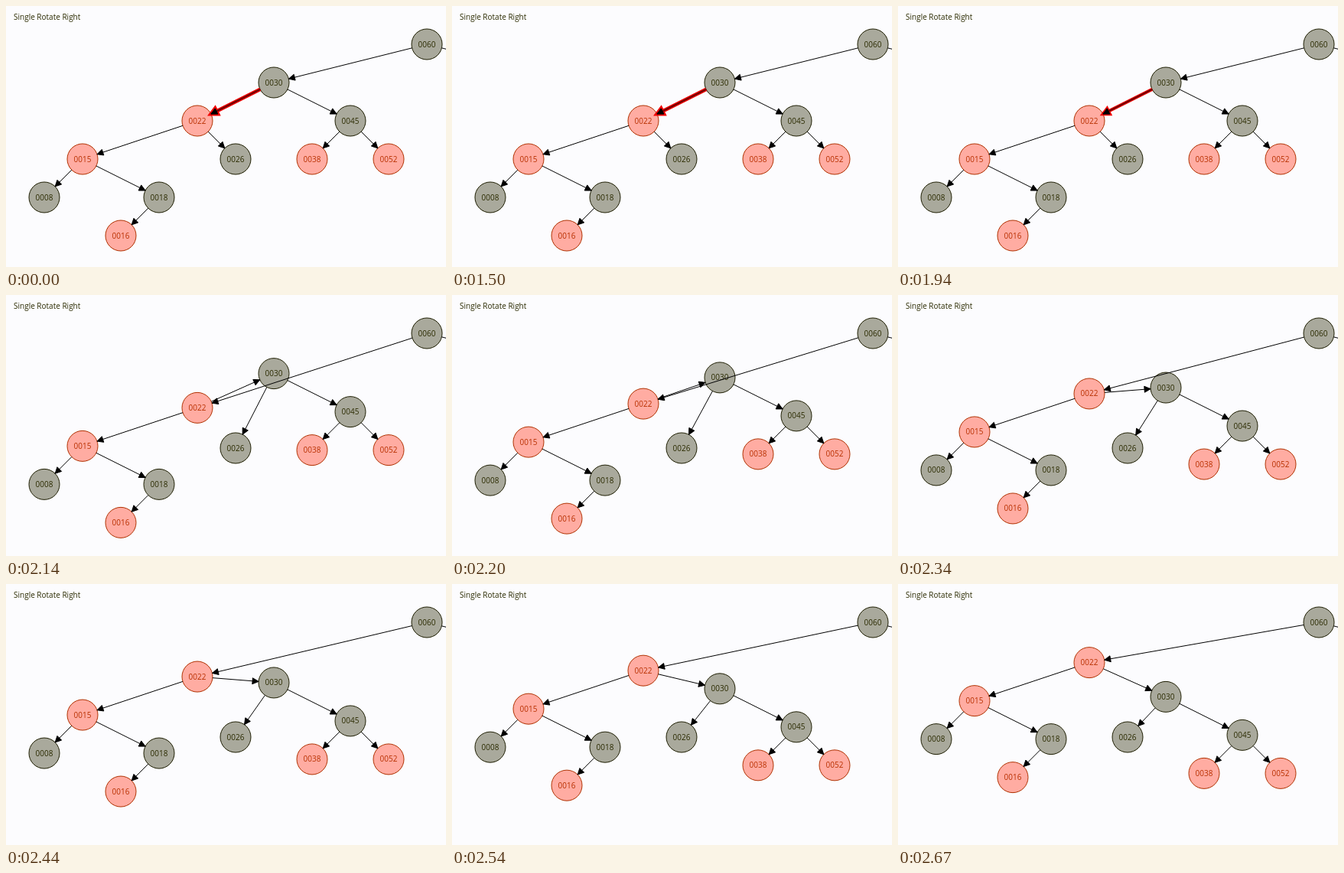
Recreate the animation shown at these times as an HTML page with a canvas. Size 575 by 341 pixels, loop 5670 ms.

```html
<!DOCTYPE html>
<html lang="en">
<head>
<meta charset="utf-8">
<title>Single Rotate Right</title>
<style>
html, body { margin: 0; width: 100%; height: 100%; overflow: hidden; background: #fcfcfe; }
canvas { display: block; }
</style>
</head>
<body>
<canvas id="stage" width="575" height="341"></canvas>
<script>
const ctx = document.getElementById('stage').getContext('2d');
const LOOP = 5670, HOLD = 1500, ROTATE = 17, LAST = 35, R = 20;
const BLACK = { fill: '#a9a99c', line: '#1c1c00', text: '#2b2b00' };
const RED = { fill: '#ffaca2', line: '#b03000', text: '#b83000' };

// value: [x, y, colours, vertical direction during the rotation]
const nodes = {
  60: [550, 50, BLACK, 0],
  70: [750, 100, BLACK, 0],
  30: [350, 100, BLACK, 1],
  22: [250, 150, RED, -1],
  45: [450, 150, BLACK, 1],
  15: [100, 200, RED, -1],
  26: [300, 200, BLACK, 0],
  38: [400, 200, RED, 1],
  52: [500, 200, RED, 1],
  8: [50, 250, BLACK, -1],
  18: [200, 250, BLACK, -1],
  16: [150, 300, RED, -1]
};
const fixedEdges = [[60, 70], [30, 45], [45, 38], [45, 52], [22, 15], [15, 8], [15, 18], [18, 16]];
const before = [[60, 30], [22, 26]];
const after = [[60, 22], [22, 30], [30, 26]];

function drawNode(value, x, y, look) {
  ctx.beginPath();
  ctx.arc(x, y, R, 0, 2 * Math.PI);
  ctx.fillStyle = look.fill;
  ctx.fill();
  ctx.lineWidth = 1;
  ctx.strokeStyle = look.line;
  ctx.stroke();
  ctx.fillStyle = look.text;
  ctx.textAlign = 'center';
  ctx.fillText(String(value).padStart(4, '0'), x, y + 3.5);
}

function drawArrow([x1, y1], [x2, y2], headWidth, color, shaftWidth = headWidth) {
  const len = Math.hypot(x2 - x1, y2 - y1);
  const ux = (x2 - x1) / len, uy = (y2 - y1) / len;
  const tipX = x2 - ux * R, tipY = y2 - uy * R;
  const backX = tipX - ux * 8, backY = tipY - uy * 8;
  ctx.strokeStyle = ctx.fillStyle = color;
  ctx.lineWidth = shaftWidth;
  ctx.beginPath();
  ctx.moveTo(x1 + ux * R, y1 + uy * R);
  ctx.lineTo(tipX, tipY);
  ctx.stroke();
  ctx.lineWidth = headWidth;
  ctx.beginPath();
  ctx.moveTo(tipX, tipY);
  ctx.lineTo(backX + uy * 4, backY - ux * 4);
  ctx.lineTo(backX - uy * 4, backY + ux * 4);
  ctx.closePath();
  ctx.stroke();
  ctx.fill();
}

// Triangle wave between 3 and 8 with a period of 14 steps
function pulse(step) {
  const phase = (step + 2.6) % 14;
  return 3 + 5 * Math.min(phase, 14 - phase) / 7;
}

function draw(time) {
  // Thirty steps a second, on a 10 ms clock
  const ticks = Math.floor((time - HOLD) / 10);
  const step = Math.min(LAST, Math.max(0, Math.floor(ticks * 0.3 + 1e-6)));
  const rotated = step >= ROTATE;
  // One step is skipped early in the move
  const moves = Math.max(0, step - (step < 23 ? 18 : 17));
  const shift = moves * 50 / 19;
  const at = value => {
    const [x, y, , dir] = nodes[value];
    return [x, y + dir * shift];
  };

  ctx.fillStyle = '#fcfcfe';
  ctx.fillRect(0, 0, 575, 341);
  ctx.font = '10px "Open Sans", "Noto Sans", sans-serif';
  ctx.fillStyle = '#2b2b00';
  ctx.textAlign = 'left';
  ctx.fillText('Single Rotate Right', 10, 18);

  for (const value in nodes) drawNode(value, ...at(value), nodes[value][2]);
  for (const [from, to] of [...fixedEdges, ...(rotated ? after : before)])
    drawArrow(at(from), at(to), 1, '#000');

  if (!rotated) {
    drawArrow(at(30), at(22), pulse(step), '#f00000');
    drawArrow(at(30), at(22), 1, '#a00000', 2.6);
    drawArrow(at(30), at(22), 1, '#000', 0.5);
  }
}

function tick() {
  draw(performance.now() % LOOP);
  requestAnimationFrame(tick);
}
tick();
</script>
</body>
</html>
```
